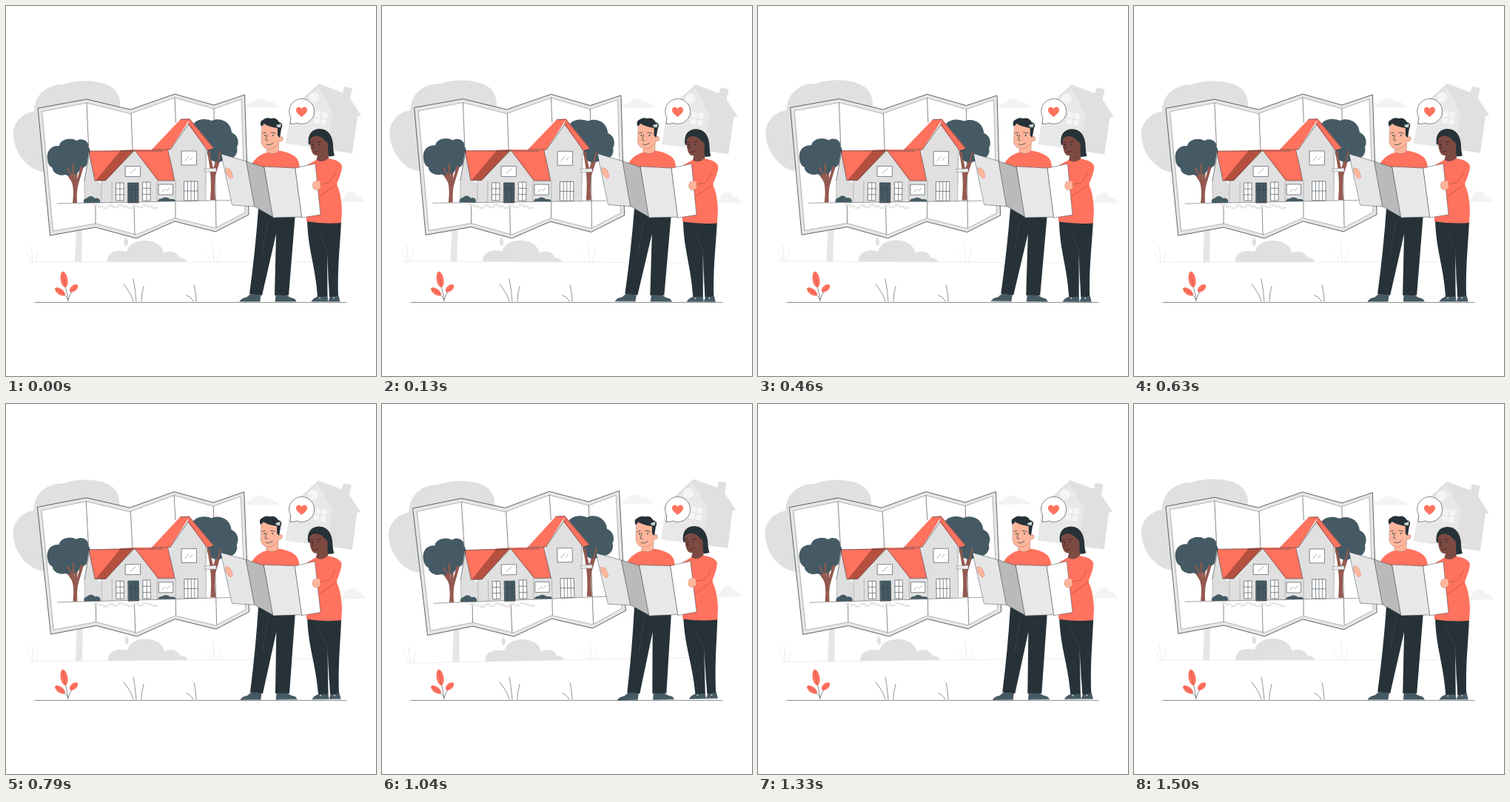
An HTML page with a canvas for the animation above (1.54 s loop, 500x500 px).

```html
<!DOCTYPE html>
<html lang="en">
<head>
<meta charset="utf-8">
<title>House plan</title>
<style>
  html, body { margin: 0; width: 100%; height: 100%; overflow: hidden; background: #fff; }
  canvas { display: block; width: 500px; height: 500px; }
</style>
</head>
<body>
<canvas id="stage"></canvas>
<script>
const LOOP = 1540, STEPS = 37, PEAK = 300, SWAY = 1;
const CORAL = '#ff725e', MAROON = '#b5503f', DARK = '#263238', SLATE = '#455a64';
const INK = '#37424a', GREY = '#e0e0e0', MIST = '#f3f3f3', SKIN = '#ffb59b', BROWN = '#7d4a42';

const canvas = document.getElementById('stage');
const ctx = canvas.getContext('2d');
const ratio = window.devicePixelRatio || 1;
canvas.width = canvas.height = 500 * ratio;

function shape(d, fill, stroke, width = 0.7) {
  const path = new Path2D(d);
  if (fill) { ctx.fillStyle = fill; ctx.fill(path); }
  if (stroke) { ctx.strokeStyle = stroke; ctx.lineWidth = width; ctx.stroke(path); }
}
const line = (d, color = INK, width = 0.7) => shape(d, null, color, width);

function oval(x, y, rx, ry, fill, turn = 0) {
  ctx.beginPath();
  ctx.ellipse(x, y, rx, ry, turn, 0, Math.PI * 2);
  ctx.fillStyle = fill;
  ctx.fill();
}

function pane(x, y, w, h, cols, rows) {
  let d = `M${x} ${y}h${w}v${h}h${-w}Z`;
  for (let i = 1; i < cols; i++) d += `M${x + w * i / cols} ${y}v${h}`;
  for (let i = 1; i < rows; i++) d += `M${x} ${y + h * i / rows}h${w}`;
  shape(d, '#fff', INK, 0.6);
}

function turned(x, y, degrees, draw) {
  ctx.save();
  ctx.translate(x, y);
  ctx.rotate(degrees * Math.PI / 180);
  ctx.translate(-x, -y);
  draw();
  ctx.restore();
}

function scenery() {
  // large tree
  shape('M95 300H103L102 346H93Z', '#e6e6e6');
  shape('M48 224C26 219 10 195 10 173C10 157 22 145 38 142C38 122 54 105 78 106C92 100 122 99 138 107C150 112 156 124 154 140L120 215Z', GREY);
  // bush and horizon
  shape('M137 346C136 335 146 328 163 332C166 321 177 317 187 317C201 317 212 324 213 334C222 329 232 333 234 340C240 340 244 343 244 346Z', GREY);
  shape('M162 325C158 320 159 316 162 313C166 317 166 322 162 325Z', GREY);
  line('M30 346H418', '#e9e9e9', 0.8);
  line('M27 331Q32 337 34 345M34 324L36 345M43 331L40 345M270 335Q275 340 277 346M279 320L281 346M289 331L285 346', '#e8e8e8', 0.8);
  // clouds
  shape('M323 137C326 131 331 132 333 130C337 124 349 123 353 129C358 128 363 131 364 133Q368 134 369 137Z', MIST);
  shape('M450 265C452 260 456 262 457 258C460 249 472 248 475 257C479 256 482 258 483 261Q486 262 486 265Z', MIST);
  // far house
  shape('M385 142L423 107L448 142L437 194L378 186Z', '#e8e8e8');
  shape('M423 105L455 117L457 109L468 111L465 125L480 148L475 149L468 199L433 194L442 144L437 136Z', GREY);
  shape('M423 105L381 143L385 145L422 110L444 144L449 143Z', GREY);
  oval(416, 124, 7, 7, '#f5f5f5');
  shape('M419 142L435 144L432 161L416 158Z', '#f5f5f5');
  line('M427 143L424 160M417 150L434 153', GREY, 1);
}

function trees() {
  shape('M90 266C92 249 91 241 87 235L77 220L80 218L92 234L93 214H97L96 235L103 213L106 214L98 240Q95 249 96 266Z', '#94594f');
  shape('M56 208C54 196 61 188 72 189C73 180 88 177 95 182C103 177 113 183 111 190C117 197 112 205 110 209C111 216 105 219 101 219C97 230 86 230 80 228C71 231 62 224 63 219Q57 216 56 208Z', SLATE);
  line('M92 251L91 232L83 219M95 242L102 217M91 231L91 214', '#94594f', 2);
  shape('M276 262C278 241 277 223 272 198L275 196L280 219L288 199L292 200L283 229Q281 246 283 262Z', '#94594f');
  shape('M253 160C257 153 269 151 278 155C289 150 304 156 305 171C313 174 316 184 312 191C315 202 304 210 296 206C290 214 279 211 275 206Z', SLATE);
  line('M278 232L275 197M282 226L290 196M276 208L271 193', '#94594f', 1.8);
}

function house() {
  // walls
  shape('M112 197L121 236L129 240V266L106 265V235Z', '#dedede');
  shape('M129 236L173 195L206 236V265L129 266Z', GREY);
  shape('M204 236H230V264H204Z', GREY);
  shape('M221 193L247 157L272 193L270 263L229 264L226 236Z', GREY);
  line('M106 235V265M129 236V266M143 237V266M204 236V265M229 236V264M270 193V263', '#8a8a8a', 0.5);
  // lower roof
  shape('M112 196L160 195L124 236H120Z', CORAL);
  shape('M155 195L174 194L135 236H121Z', MAROON);
  shape('M173 194L219 194L228 236H205Z', CORAL);
  line('M113 196L106 236M112 196H212M112 196L120 236H134L174 195L206 236H228L219 194', INK, 0.6);
  // tower roof
  shape('M236 153L249 152L222 194H197Z', CORAL);
  shape('M248 152L281 192L272 195L246 160Z', CORAL);
  line('M236 153H248L281 193L272 195L247 159L222 194H197', INK, 0.6);
  shape('M269 220L284 219V224H269Z', '#eee', '#777', 0.5);
  // openings
  pane(161.5, 216.5, 20, 14, 1, 1);
  pane(237.5, 196, 20, 19, 1, 1);
  pane(206.5, 241, 19, 14, 1, 1);
  pane(149, 239, 10, 24, 2, 3);
  pane(185, 238, 10, 25, 2, 3);
  pane(241, 237, 18, 26, 4, 2);
  line('M168 226L175 220M242 209L247 203M249 208L252 204M211 251L215 247M217 250L221 246', '#777', 0.6);
  shape('M165 239H179V266H165Z', SLATE, DARK);
  line('M169 242V264M175 242V264M165 248H179', '#334650', 0.6);
  // planting and path
  shape('M105 266C104 260 109 260 110 259C114 255 119 258 120 260C125 258 128 262 127 266Z', SLATE);
  shape('M205 264C206 259 211 261 213 259C218 257 221 261 222 261C227 260 229 262 229 264Z', SLATE);
  line('M69 267L303 262.5', '#666', 0.6);
  for (let i = 0; i < 13; i++) {
    oval(121 + i * 6.7, 269 + (i * 7 % 5), 4.3, 1.5, '#e6e6e6', -0.08);
  }
}

function plan() {
  shape('M43.5 138L109 126L168 140L228 119L281 134L322.5 120L328 282L283 305L228 291L176 314L121 299L60 310Z', '#e6e6e6', INK, 0.8);
  shape('M49 142.5L109 131L168 145.5L228 124L281 139L318 126L323 279L283 300L228 286.5L176 309L121 294L64 304Z', '#fff', '#777', 0.5);
  line('M109 131L112 199M121 268V294M169 145L171 194M173 270L174 309M228 124L229.5 157M229 265V286M281 139L284 299', '#555', 0.7);
  trees();
  house();
}

function woman() {
  shape('M407 289C408 330 418 350 421 393H434.5L434 335L437 393H449C448 350 451 330 453 291Z', DARK);
  line('M422 303L434 330L436 374', '#45525a', 0.5);
  shape('M413 399Q415 395 421 393L434 392L435 399ZM436 399L438 393L449 391L451 399Z', SLATE, DARK, 0.5);
  oval(424, 394.5, 1, 1, '#cfd8dc');
  oval(443, 394.5, 1, 1, '#cfd8dc');
  shape('M409 187C407 174 413 166 424 166C435 166 441 175 442 187Q442 196 444 202Q440 204 433 203L420 190Z', DARK);
  shape('M411 180C416 173 426 175 431 182Q437 185 435 193L436 207Q427 216 419 210L421 202C414 203 411 195 411 180Z', BROWN);
  line('M412 184L415 183M420 184L426 183M416 186L414 192L417 192M417 197Q421 198 423 195', '#3e2524', 0.8);
  oval(414, 187, 0.8, 1, DARK);
  oval(423, 187, 0.8, 1, DARK);
  shape('M405 216L419 208Q428 213 435 206Q451 208 454 216C454 225 449 234 447 241Q453 253 454 276L453 293Q429 295 406 291Z', CORAL);
  line('M447 241L424 257M445 225Q442 234 435 239L423 241', '#a84d42', 0.6);
}

function man() {
  shape('M341 274Q337 330 329 389L346 391L365 308L363 391H382L391 280Z', DARK);
  line('M354 290L346 335', '#45525a', 0.5);
  shape('M316 399Q318 395 325 394L331 389L344 391L343 399ZM364 399L365 390L379 391Q384 395 390 396L392 399Z', SLATE, DARK, 0.5);
  shape('M332 214Q337 204 349 199L366 195Q382 197 390 203Q397 208 397 221L387 277H348Z', CORAL);
  shape('M346 161Q357 156 370 163L370 177Q375 175 374 181Q372 184 369 182L368 197Q360 202 352 197L353 193Q346 191 345 183Z', SKIN, '#8d5b4c', 0.4);
  shape('M345 163Q342 156 347 154Q351 150 358 152Q365 150 369 157Q376 158 372 166L370 178L367 175L367 165Q354 163 349 159Z', DARK);
  shape('M365 161L372 159L371 164L367 164Z', '#c5d2d6');
  line('M347 172L351 171M358 171L364 172M353 174L351 181L354 182M352 187Q357 189 361 185', INK, 0.8);
  oval(350, 175, 0.8, 1.1, DARK);
  oval(361, 175, 0.8, 1.1, DARK);
  line('M354 193Q361 194 366 188', '#c57d68', 0.6);
}

function leaflet() {
  shape('M291 200L325 210L336 271L306 269Z', '#e6e6e6', INK, 0.5);
  shape('M325 210L349 218L362 286L336 271Z', '#bababa', INK, 0.5);
  shape('M349 217L391 219L400 285L361 286Z', '#e8e8e8', INK, 0.5);
  shape('M391 219L418 213L425 282L400 286Z', '#fff', INK, 0.5);
  shape('M297 219Q304 219 305 225L307 231Q304 236 300 230L297 225Z', SKIN, '#c57d68', 0.4);
  shape('M416 238Q422 234 425 238V246Q418 251 415 246Q413 242 416 238Z', SKIN, '#c57d68', 0.4);
}

function couple() {
  woman();
  man();
  leaflet();
}

function foreground() {
  line('M39 400.5H460', '#6f787d', 0.8);
  line('M159 376Q168 386 172 399M172 369Q175 384 176 399M186 379Q183 389 183 399M244 391Q250 393 253 399M254 377Q257 388 257 399', '#5d666b', 0.7);
  line('M84 399Q83 386 79 375M84 396Q80 391 75 388M84 397Q86 390 90 384', INK, 0.6);
  oval(78.5, 369.5, 4.8, 10.8, CORAL, -0.17);
  oval(73, 386, 4, 8, CORAL, -0.95);
  oval(91.5, 381.5, 3.9, 6.8, CORAL, 0.85);
  line('M77 361L80 379M67 382L80 390M96 377L87 387', '#a84d42', 0.5);
  // bubble
  shape('M384 159L385 151A17 17 0 1 1 393 158Q389 160 384 159Z', '#fff', INK, 0.6);
  shape('M399.5 150C395 146 392 144 392 140.5C392 136 397.5 135 399.5 139C401.5 135 407 136 407 140.5C407 144 404 146 399.5 150Z', CORAL);
}

// Linear swing between +SWAY and -SWAY degrees.
function swing(ms) {
  const u = (((ms - PEAK) % LOOP) + LOOP) % LOOP / LOOP;
  return SWAY * (Math.abs(u - 0.5) * 4 - 1);
}

function render(ms) {
  const step = LOOP / STEPS;
  const angle = swing(Math.floor(ms / step) * step) - swing(0);
  ctx.setTransform(ratio, 0, 0, ratio, 0, 0);
  ctx.lineJoin = ctx.lineCap = 'round';
  ctx.fillStyle = '#fff';
  ctx.fillRect(0, 0, 500, 500);
  turned(245, 225, angle, scenery);
  turned(186, 216, angle, plan);
  foreground();
  turned(375, 275, angle, couple);
}

const start = performance.now();
function tick(now) {
  render(Math.max(0, now - start) % LOOP);
  requestAnimationFrame(tick);
}
render(0);
requestAnimationFrame(tick);
</script>
</body>
</html>
```
